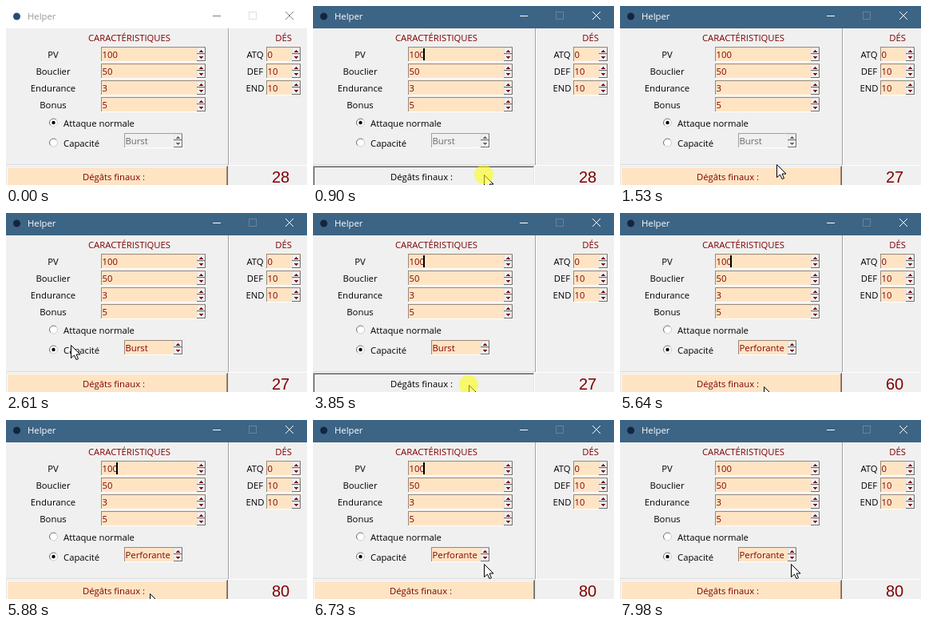
An HTML page with a canvas that plays this animation: 377x224 px, repeating every 8000 ms.

```html
<!DOCTYPE html>
<html lang="fr">
<head>
<meta charset="utf-8">
<title>Helper</title>
<style>
  html, body { margin: 0; width: 100%; height: 100%; overflow: hidden; background: #f0f0f0; }
  canvas { display: block; width: 377px; height: 224px; }
</style>
</head>
<body>
<canvas id="stage" width="377" height="224"></canvas>
<script>
const ctx = document.getElementById('stage').getContext('2d');
const LOOP = 8000, STEP = 75, HOLD = 70;
const UI_FONT = '11.3px "Open Sans", "Noto Sans", sans-serif';
const BIG_FONT = '20px "Liberation Sans", Arial, sans-serif';
const FACE = '#f0f0f0', PEACH = '#ffe4c4', MAROON = '#800000', WHITE = '#ffffff';
const GREY = '#a0a0a0', DARK = '#696969', PALE = '#e3e3e3', TAN = '#998976';

const CLICKS = [
  { at: 900, on: 'button' },
  { at: 2540, on: 'ability' },
  { at: 3850, on: 'button' },
  { at: 5330, on: 'spinner' },
  { at: 5810, on: 'button' },
  { at: 7900, on: 'window' }
];
const DAMAGE = [28, 27, 60, 80];

// The pointer heads for each spot in a number of steps
const ENTRY = { x: 222, y: 226 };
const MOVES = [
  { at: 130, steps: 3, x: 214, y: 211 },
  { at: 1530, steps: 1, x: 196, y: 198 },
  { at: 1610, steps: 6, x: 81, y: 165 },
  { at: 2690, steps: 3, x: 182, y: 216 },
  { at: 3470, steps: 3, x: 195, y: 215 },
  { at: 4080, steps: 4, x: 216, y: 186 },
  { at: 4480, steps: 3, x: 213, y: 176 },
  { at: 5480, steps: 3, x: 180, y: 217 },
  { at: 6190, steps: 8, x: 214, y: 180 }
];

const easeOut = k => 1 - (1 - k) ** 1.5;
const heldTarget = t => CLICKS.find(c => t >= c.at && t < c.at + HOLD)?.on;
const released = (t, on) => CLICKS.filter(c => c.on === on && t >= c.at + HOLD).length;
const caretOn = t => t >= CLICKS[0].at && (t - CLICKS[0].at) % 900 < 600;

function pointerAt(t) {
  let { x, y } = ENTRY;
  for (const move of MOVES) {
    if (t < move.at) break;
    const done = Math.min(move.steps, Math.floor((t - move.at) / STEP) + 1);
    const k = easeOut(done / move.steps);
    x += (move.x - x) * k;
    y += (move.y - y) * k;
  }
  return [Math.round(x), Math.round(y)];
}

function rect(x, y, w, h, color) {
  ctx.fillStyle = color;
  ctx.fillRect(x, y, w, h);
}

function text(str, x, y, color = '#000', align = 'left', font = UI_FONT) {
  ctx.font = font;
  ctx.textAlign = align;
  ctx.fillStyle = color;
  ctx.fillText(str, x, y);
}

function disc(x, y, r, color) {
  ctx.fillStyle = color;
  ctx.beginPath();
  ctx.arc(x, y, r, 0, Math.PI * 2);
  ctx.fill();
}

function bevel(x, y, w, h, topLeft, bottomRight) {
  rect(x, y, w, 1, topLeft);
  rect(x, y, 1, h, topLeft);
  rect(x, y + h - 1, w, 1, bottomRight);
  rect(x + w - 1, y, 1, h, bottomRight);
}

function arrow(cx, y, up, color) {
  for (let i = 0; i < 3; i++) {
    const half = up ? i : 2 - i;
    rect(cx - half, y + i, half * 2 + 1, 1, color);
  }
}

function spinbox(x, y, w, value, enabled = true) {
  const ink = enabled ? MAROON : DARK;
  rect(x, y, w, 19, enabled ? PEACH : FACE);
  bevel(x, y, w, 19, enabled ? TAN : GREY, WHITE);
  const bx = x + w - 12;
  for (const up of [true, false]) {
    const by = y + (up ? 1 : 9), h = up ? 8 : 9;
    rect(bx, by, 11, h, FACE);
    bevel(bx, by, 11, h, PALE, DARK);
    arrow(bx + 5, by + 3, up, ink);
  }
  text(value, x + 1.5, y + 14, ink);
}

function radio(y, label, selected, held) {
  const x = 59.5;
  disc(x, y, 5.5, held ? FACE : WHITE);
  ctx.lineWidth = 1;
  [DARK, '#c8c8c8'].forEach((color, i) => {
    ctx.strokeStyle = color;
    ctx.beginPath();
    ctx.arc(x, y, 5, (0.75 + i) * Math.PI, (1.75 + i) * Math.PI);
    ctx.stroke();
  });
  if (selected) disc(x, y, 2.2, '#000');
  text(label, 72, y + 5);
}

function cross(x, y, size, color) {
  ctx.strokeStyle = color;
  ctx.lineWidth = 1;
  ctx.beginPath();
  ctx.moveTo(x, y);
  ctx.lineTo(x + size, y + size);
  ctx.moveTo(x + size, y);
  ctx.lineTo(x, y + size);
  ctx.stroke();
}

function titleBar(active) {
  rect(0, 0, 377, 28, active ? '#3c6485' : WHITE);
  disc(13.5, 13, 4.5, active ? '#15243f' : '#294a78');
  text('Helper', 27, 17, active ? WHITE : '#999999');
  const ink = active ? WHITE : '#808080';
  rect(259, 12, 10, 1, ink);
  ctx.lineWidth = 1;
  ctx.strokeStyle = active ? '#64849f' : '#e0e0e0';
  ctx.strokeRect(304.5, 7.5, 9, 9);
  cross(350, 7, 10, ink);
}

function button(pressed) {
  rect(0, 200, 278, 26, pressed ? FACE : PEACH);
  bevel(0, 200, 278, 26, pressed ? GREY : PALE, pressed ? WHITE : DARK);
  bevel(1, 201, 276, 24, pressed ? DARK : WHITE, pressed ? PALE : TAN);
  text('Dégâts finaux :', pressed ? 97 : 96, 218, pressed ? '#000' : MAROON);
}

function pointer(x, y) {
  const shape = [[0, 0], [0, 16], [4, 12.5], [6.5, 18], [9, 17], [6.5, 11.5], [11.5, 11.5]];
  ctx.beginPath();
  for (const [dx, dy] of shape) ctx.lineTo(x + dx + 0.5, y + dy + 0.5);
  ctx.closePath();
  ctx.fillStyle = WHITE;
  ctx.fill();
  ctx.strokeStyle = '#000';
  ctx.lineWidth = 1;
  ctx.stroke();
}

function fields(entries, labelX, boxX, boxW) {
  Object.entries(entries).forEach(([label, value], i) => {
    text(label, labelX, 65 + 21 * i, '#000', 'center');
    spinbox(boxX, 51 + 21 * i, boxW, value);
  });
}

function draw(t) {
  const held = heldTarget(t);
  rect(0, 0, 377, 224, FACE);
  titleBar(t >= CLICKS[0].at);

  rect(278, 28, 1, 171, GREY);
  rect(279, 28, 1, 171, WHITE);
  rect(0, 198, 278, 1, '#d8d8d8');
  rect(0, 199, 377, 1, WHITE);

  text('CARACTÉRISTIQUES', 154.5, 44, MAROON, 'center');
  fields({ PV: '100', Bouclier: '50', Endurance: '3', Bonus: '5' }, 59, 119, 132);
  text('DÉS', 347.5, 44, MAROON, 'center');
  fields({ ATQ: '0', DEF: '10', END: '10' }, 312, 326, 44);

  const ability = released(t, 'ability') > 0;
  radio(146, 'Attaque normale', !ability, false);
  radio(171, 'Capacité', ability, held === 'ability');
  spinbox(148, 159, 74, released(t, 'spinner') ? 'Perforante' : 'Burst', ability);
  if (caretOn(t)) rect(138, 53, 2, 15, '#000');

  button(held === 'button');
  text(String(DAMAGE[released(t, 'button')]), 344, 221, MAROON, 'center', BIG_FONT);

  if (t >= MOVES[0].at) {
    const [x, y] = pointerAt(t);
    pointer(x, y);
    if (held) disc(x, y, 12, 'rgba(255, 255, 0, 0.55)');
  }
}

function tick() {
  draw(performance.now() % LOOP);
  requestAnimationFrame(tick);
}
tick();
</script>
</body>
</html>
```
